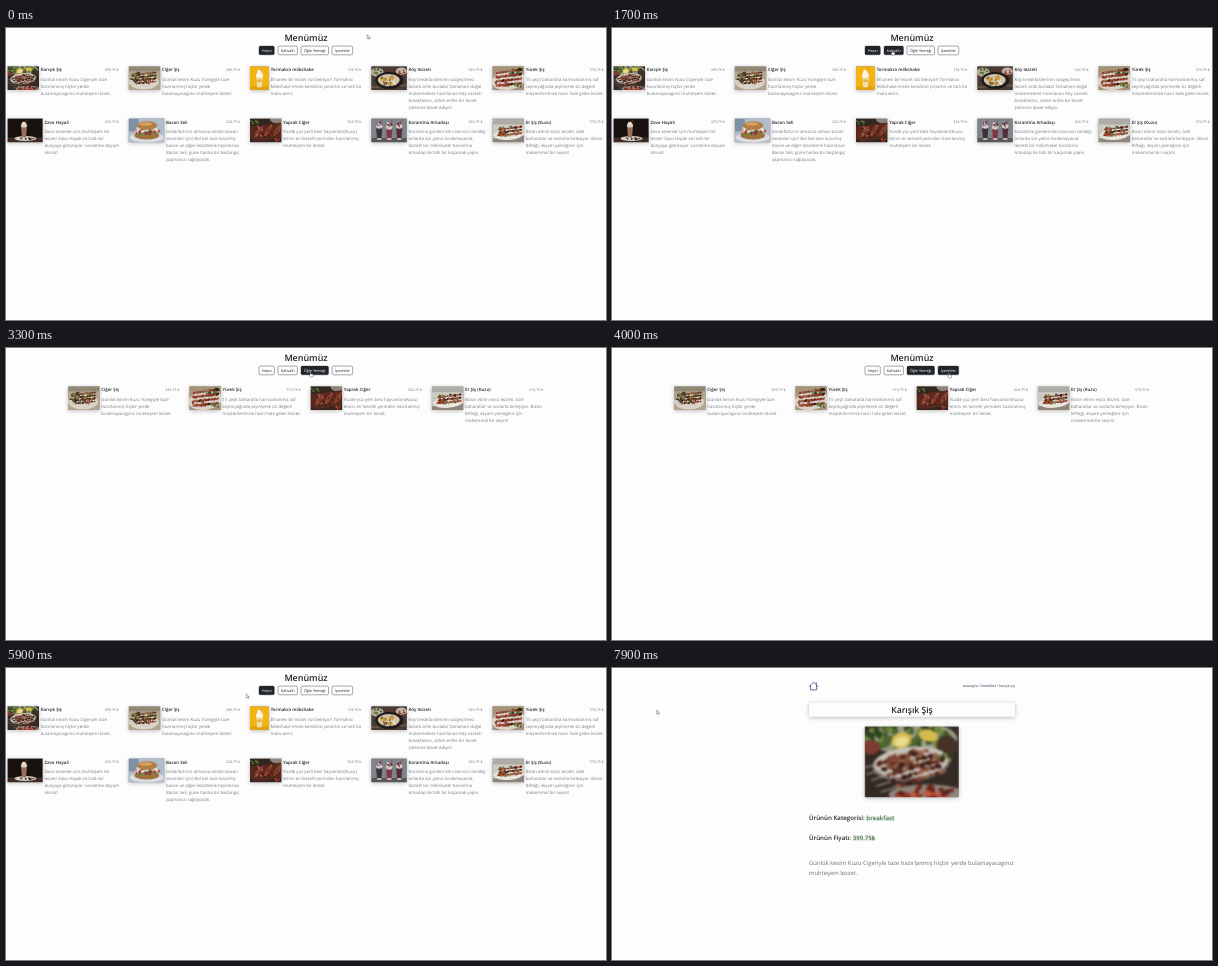
Recreate the animation shown at these times as an HTML page. Size 600 px wide and 292 px high, loop 8000 ms.

```html
<!DOCTYPE html>
<html lang="tr">
<head>
<meta charset="utf-8">
<title>Menümüz</title>
<style>
  html, body { margin: 0; width: 100%; height: 100%; overflow: hidden; background: #fdfdfd; }
  svg { display: block; width: 100%; height: 100%; font-family: "Open Sans", "Noto Sans", sans-serif; text-rendering: geometricPrecision; }
  .h { font-weight: 600; fill: #212529; }
  .body { font-size: 4.34px; fill: #757b82; }
  .price { font-size: 3.6px; fill: #6c757d; text-anchor: end; }
  .btn { font-size: 3.75px; text-anchor: middle; }
  .mid { text-anchor: middle; }
  .photo { filter: drop-shadow(0 1.5px 2px rgba(0, 0, 0, .26)); }
  .soft { filter: blur(.3px); }
  .value { fill: #587a5a; text-shadow: 0 1px 1px rgba(60, 150, 80, .45); }
</style>
</head>
<body>
<svg id="stage" viewBox="0 0 600 292" xmlns="http://www.w3.org/2000/svg"></svg>
<script>
const LOOP = 8000, STEP = 100, PITCH = 121.25, PHOTO_H = 23.7;
const stage = document.getElementById('stage');

// ---- drawing helpers (return SVG markup) ----
let seed = 7;
const rnd = () => (seed = (seed * 16807) % 2147483647) / 2147483647;
const rect = (x, y, w, h, fill, r = 0) => `<rect x="${x}" y="${y}" width="${w}" height="${h}" rx="${r}" fill="${fill}"/>`;
const oval = (x, y, rx, ry, fill, rot = 0) => `<ellipse cx="${x}" cy="${y}" rx="${rx}" ry="${ry}" fill="${fill}" transform="rotate(${rot} ${x} ${y})"/>`;
const line = (x1, y1, x2, y2, color, w) => `<path d="M${x1} ${y1}L${x2} ${y2}" stroke="${color}" stroke-width="${w}"/>`;
const poly = (points, fill) => `<polygon points="${points}" fill="${fill}"/>`;
const text = (x, y, cls, str, size) => `<text x="${x}" y="${y}" class="${cls}"${size ? ` font-size="${size}"` : ''}>${str}</text>`;

// Scatter small ovals inside an ellipse.
function scatter(n, x, y, rx, ry, size, colors) {
  let out = '';
  for (let i = 0; i < n; i++) {
    const a = rnd() * 6.283, d = Math.sqrt(rnd());
    out += oval((x + Math.cos(a) * d * rx).toFixed(2), (y + Math.sin(a) * d * ry).toFixed(2),
      size * (.7 + rnd() * .6), size * (.45 + rnd() * .4), colors[i % colors.length], rnd() * 180);
  }
  return out;
}

// A skewer with uneven, overlapping chunks along it.
function skewer(x1, y1, x2, y2, size, colors) {
  let out = line(x1, y1, x2, y2, '#a39d92', .35);
  const angle = Math.atan2(y2 - y1, x2 - x1) * 57.3;
  for (let i = 0; i < 9; i++) {
    const k = .26 + i * .085, s = size * (.8 + rnd() * .4);
    out += oval(x1 + (x2 - x1) * k, y1 + (y2 - y1) * k, s, s * .7, colors[Math.floor(rnd() * colors.length)], angle + rnd() * 60 - 30);
  }
  return out;
}

const glass = (x, y, w, h, drink, foam) =>
  poly(`${x - w / 2},${y} ${x + w / 2},${y} ${x + w * .34},${y + h} ${x - w * .34},${y + h}`, drink) +
  oval(x, y, w * .52, w * .34, foam);

const MEAT = ['#5a2c1f', '#7d4632', '#3b1e17', '#945c47'];
const GREEN = ['#4c6430', '#71883f', '#2f4320'];
const RED = ['#9c3424', '#c4553c', '#762519'];

const photos = {
  mixed: w => rect(0, 0, w, 24, '#332a26') + oval(16, 4, 15, 5.5, '#9d9d86') + scatter(46, 14, 3.5, 14, 4.2, 1.6, GREEN) +
    oval(12.3, 4.6, 3.4, 2.6, '#d3bb4e', -14) + oval(12.3, 5, 2.4, 1.6, '#e9dc8c', -14) +
    oval(21.3, 3, 3.2, 2, '#d3bb4e', 14) + oval(27.5, 6.5, 3.5, 3.5, '#463126') + oval(2, 7, 3, 2.4, '#7e3b2f') +
    oval(15.5, 12.6, 13, 5.7, '#77716b', -5) + oval(15.5, 12, 12.6, 5.2, '#c6c0b7', -5) +
    scatter(40, 17, 11.6, 9.8, 3.2, 1.3, MEAT) +
    [0, 1, 2, 3, 4].map(i => skewer(-1 + i * 1.6, 14 + i * 2, 22 + i * 1.3, 7.8 + i * 1.7, 1.05, MEAT)).join('') +
    scatter(10, 18, 11, 8, 3, .45, ['#c08a72', '#e0b8a0']) + scatter(5, 27, 10, 2, 2, .8, GREEN) +
    oval(21, 22.8, 13, 3.4, '#8f837c') + scatter(30, 20, 22.5, 11, 2.3, 1.2, [...RED, '#56251c']),
  liver: w => rect(0, 0, w, 24, '#b3a48d') + rect(0, 0, w, 5, '#8f8874') + oval(15, 15.5, 15, 7.6, '#d8d2c8') +
    scatter(34, 14, 11.5, 12, 5.5, 1.8, [...GREEN, '#4a3020']) +
    [0, 1, 2, 3].map(i => skewer(1, 9 + i * 3, 28, 6 + i * 3, 1.3, MEAT)).join('') + scatter(6, 20, 15, 6, 3, 1.1, RED),
  yellowShake: w => rect(0, 0, w, 24, '#f3b411') + rect(0, 20, w, 4, '#e2a40e') +
    glass(9.5, 9, 6.8, 12, '#f2dfb2', '#fbf3e0') + oval(9.5, 6, 2.4, 2.6, '#fdf6e8') +
    line(10.5, 6, 12.2, 1.5, '#d9752f', .6) + rect(7, 13, 5, 3, '#e5b860', .6),
  eggs: w => rect(0, 0, w, 24, '#4a3a31') + line(0, 21, w, 19, '#6b594c', 1.5) +
    oval(6, 6, 6.5, 4.5, '#b5ab99') + scatter(8, 6, 5, 4, 2.4, 1.3, GREEN) + oval(30, 5, 5.5, 3.8, '#bdb4a5') + scatter(7, 30, 6, 3.5, 2.4, 1.1, RED) +
    oval(18, 14, 14, 8.6, '#1f1c1b') + oval(17.5, 13.8, 11, 6.2, '#cfc3a8') + scatter(16, 17, 14, 10, 5.5, 1.2, ['#8a6a3f', '#5c4429', '#eee7d8']) +
    oval(13, 13, 2.5, 1.9, '#d69a2b') + oval(20.5, 11.8, 2.5, 1.9, '#d69a2b') + oval(19, 16.7, 2.4, 1.6, '#cf9028') + scatter(7, 17, 14, 8, 5, .6, GREEN),
  heart: w => rect(0, 0, w, 24, '#a99378') + oval(16, 14, 17, 9.5, '#d9d2c8', -8) + scatter(16, 24, 6, 7, 4, 1.5, GREEN) +
    [0, 1, 2, 3].map(i => skewer(-4, 8 + i * 4, 30, 3 + i * 4.6, 1.8, [...MEAT, '#9c3424'])).join('') +
    scatter(12, 10, 18, 8, 3, 1.2, RED) + scatter(9, 25, 19, 5, 2.4, 1.2, GREEN),
  cookieShake: w => rect(0, 0, w, 24, '#17120f') + rect(0, 19, w, 5, '#3d2a20') + oval(18, 20, 11, 2.6, '#d5cfc8') +
    scatter(8, 19, 20, 8, 1.4, 1.2, ['#2a1b15', '#4a3024']) + glass(16.5, 7, 6, 12, '#99705b', '#dfcabb') + oval(16.5, 5, 2.3, 1.7, '#ece2d8') +
    line(17.5, 5, 19.5, .8, '#a14436', .6),
  bacon: w => rect(0, 0, w, 24, '#aebccc') + rect(0, 0, 10, 13, '#7f91a6') + oval(18, 19, 17, 5, '#dcdde2') +
    oval(18, 17, 12.5, 4, '#a0713f') + scatter(14, 17, 14.5, 13, 2.2, 1.8, GREEN) + scatter(22, 18, 12.5, 12, 2.6, 1.8, ['#8c3c31', '#d9a28c', '#b0584a', '#efe3cc']) +
    oval(18.5, 7, 10, 4.2, '#b37c40') + oval(17, 5.4, 6.5, 1.8, '#d0a261'),
  slab: w => rect(0, 0, w, 24, '#33251f') + oval(28, 1, 8, 4, '#8d857d') + poly(`0,8 ${w},4 ${w},19 6,23 0,20`, '#55291f') +
    [0, 1, 2, 3, 4, 5].map(i => oval(4 + i * 4.7, 13.5 - i * .4, 2.2, 7, i % 2 ? '#84402f' : '#5f271c', 34)).join('') +
    scatter(26, 16, 12, 14, 6.5, 1, ['#b06a52', '#2d140f', '#713324']) + scatter(9, 5, 4, 5, 2, 1.2, GREEN) + scatter(4, 27, 21, 3, 2, 1.2, RED),
  trio: w => rect(0, 0, w, 24, '#7f838a') + rect(0, 19.5, w, 4.5, '#5a5558') +
    ['#3b3138', '#7d3844', '#54303a'].map((c, i) => glass(8 + i * 10, 8 + i % 2, 6.4, 13, c, '#cfc5c6') +
      scatter(8, 8 + i * 10, 5.8, 2.8, 2.2, 1, ['#9a3340', '#e2d9d6', '#332428']) + oval(8 + i * 10, 20.5, 2.6, .9, '#c9c3c3') +
      line(9 + i * 10, 6, 11 + i * 10, 1, '#b03d47', .6)).join(''),
  lamb: w => rect(0, 0, w, 24, '#cfccc6') + rect(0, 0, w, 6, '#aeaca6') + poly(`0,20 ${w},17 ${w},24 0,24`, '#8f867b') + oval(16, 16, 15, 5.5, '#e9e6e0', -4) +
    scatter(26, 15, 12.5, 12, 4.5, 1.5, GREEN) + [0, 1, 2].map(i => skewer(0, 12 + i * 3, 30, 8 + i * 3.2, 1.5, [...MEAT, '#b5563a'])).join('') + scatter(6, 11, 16, 6, 2.5, 1.1, RED)
};

// ---- menu ----
const dish = (kind, photo, w, title, price, lines) => ({ kind, photo, w, title, price, lines: lines.split('|') });
const menu = [
  dish('breakfast', 'mixed', 31.5, 'Karışık Şiş', '399.75', 'Günlük kesim Kuzu Cigeriyle taze|hazırlanmış hiçbir yerde|bulamayacagınız muhteşem lezzet.'),
  dish('lunch', 'liver', 31.5, 'Ciğer Şiş', '349.75', 'Günlük kesim Kuzu Yüregiyle taze|hazırlanmış hiçbir yerde|bulamayacagınız muhteşem lezzet.'),
  dish('drinks', 'yellowShake', 19, 'Tormakra milkshake', '174.75', 'Efsanevi bir lezzet sizi bekliyor! Tormakra|Milkshake imizle kendinizi şımartın ve tatlı bir|mola verin.'),
  dish('breakfast', 'eggs', 35.6, 'Köy lezzeti', '524.75', 'Köy breakfastlerinin vazgeçilmez|lezzeti artık burada! Tamamen doğal|malzemelerle hazırlanan Köy Lezzeti|breakfastısı, sizleri enfes bir lezzet|şölenine davet ediyor.'),
  dish('lunch', 'heart', 31.5, 'Yürek Şiş', '574.75', '15 çeşit baharatla harmanlanmış saf|zeytinyağında pişirilerek siz değerli|müşterilerimize hazır hale gelen lezzet.'),
  dish('drinks', 'cookieShake', 35.2, 'Zavo Hayali', '474.75', 'Zavo sevenler için muhteşem bir|lezzet! Zavo Hayali sizi tatlı bir|dünyaya götürüyor. Lezzetine doyum|olmaz!'),
  dish('breakfast', 'bacon', 35.5, 'Bacon Seli', '224.75', 'breakfastının olmazsa olmazı bacon|sevenleri için! Bol bol taze kızarmış|bacon ve diğer lezzetlerle hazırlanan|Bacon Seli, güne harika bir başlangıç|yapmanızı sağlayacak.'),
  dish('lunch', 'slab', 31.5, 'Yaprak Ciğer', '324.75', 'Yüzde yüz yerli besi hayvanları(Kuzu)|etinin en lezzetli yerinden hazırlanmış|muhteşem bir lezzet.'),
  dish('drinks', 'trio', 35.6, 'Karantina Arkadaşı', '424.75', 'Karantina günlerinde canınızın sıkıldığı|anlarda sizi yalnız bırakmayacak|lezzetli bir milkshake! Karantina|Arkadaşı ile tatlı bir kaçamak yapın.'),
  dish('lunch', 'lamb', 31.5, 'Et Şiş (Kuzu)', '574.75', 'Bizon etinin eşsiz lezzeti, özel|baharatlar ve soslarla birleşiyor. Bizon|Bifteği, akşam yemeğiniz için|mükemmel bir seçim!')
];

function photo(name, w, x, y, scale = 1) {
  seed = 7 + name.length * 131;
  return `<g class="photo"><svg x="${x}" y="${y}" width="${w * scale}" height="${PHOTO_H * scale}" viewBox="0 0 ${w} ${PHOTO_H}" preserveAspectRatio="none">
    <g clip-path="inset(0 round ${1.2 / scale}px)"><g class="soft">${rect(-2, -2, w + 4, 28, '#6b6158')}${photos[name](w)}</g></g></svg></g>`;
}

function card(d, x, y) {
  const tx = x + d.w + 1.7;
  return photo(d.photo, d.w, x, y) + text(tx, y + 5, 'h', d.title, 4.4) +
    text(x + 111.4, y + 4.6, 'price', d.price + ' ₺') +
    d.lines.map((s, i) => text(tx, y + 14.5 + i * 7.08, 'body', s)).join('');
}

function list(kind) {
  const items = menu.filter(d => kind === 'all' || d.kind === kind);
  const cols = Math.min(5, items.length), left = 1.5 + (5 - cols) * PITCH / 2;
  return items.map((d, i) => card(d, left + i % cols * PITCH, 38.3 + Math.floor(i / cols) * 52.2)).join('');
}

const kinds = ['all', 'breakfast', 'lunch', 'drinks'];
const buttons = [
  { label: 'Hepsi', x: 253, w: 15.3 },
  { label: 'Kahvaltı', x: 272, w: 19.4 },
  { label: 'Öğle Yemeği', x: 295, w: 27.5 },
  { label: 'İçecekler', x: 326, w: 20.7 }
];
const BTN_Y = 18.1, BTN_H = 8.7;

const detail = `
  <g fill="none" stroke="#465a86" stroke-width=".85" stroke-linejoin="round" stroke-linecap="round">
    <path d="M197.3 18.4L201.6 14.1L205.9 18.4M198.6 17.4V21.9H204.6V17.4M204.3 16.4V14.6"/></g>
  <text x="403" y="18.7" font-size="3.55" fill="#2c3150" text-anchor="end">anasayfa / breakfast / karışık şiş</text>
  <rect class="photo" x="197" y="34.4" width="206" height="14.3" rx="1" fill="#fdfdfd"/>
  ${text(300, 45.3, 'h mid', menu[0].title, 8.6)}
  ${photo('mixed', 31.5, 252.8, 58.5, 2.985)}
  ${text(197, 152.4, 'h', 'Ürünün Kategorisi: <tspan class="value">breakfast</tspan>', 6.15)}
  ${text(197, 171.6, 'h', 'Ürünün Fiyatı: <tspan class="value">399.75₺</tspan>', 6.15)}
  <g font-size="5.9" fill="#6c757d">
    <text x="197" y="197.1">Günlük kesim Kuzu Cigeriyle taze hazırlanmış hiçbir yerde bulamayacagınız</text>
    <text x="197" y="207.1">muhteşem lezzet.</text></g>`;

stage.innerHTML = `<rect width="600" height="292" fill="#fdfdfd"/>
  <g id="head">${text(300, 12.6, 'h mid', 'Menümüz', 8.95)}
  ${buttons.map(b => `<g class="tab"><rect x="${b.x}" y="${BTN_Y}" width="${b.w}" height="${BTN_H}" rx="1.4" stroke="#212529" stroke-width=".4"/>${text(b.x + b.w / 2, 23.9, 'btn', b.label)}</g>`).join('')}</g>
  ${kinds.map(k => `<g id="${k}">${list(k)}</g>`).join('')}
  <g id="detail">${detail}</g>
  <g id="cursor" stroke="#222" stroke-width=".35" stroke-linejoin="round" fill="#fff">
    <path id="arrow" d="M0 0V4.2L1 3.3L1.7 4.8L2.3 4.5L1.7 3.1H3Z"/>
    <path id="hand" d="M-.4 .3Q0 -.2 .4 .3V1.8L2.4 2.3Q2.8 2.5 2.6 3.5L2.2 4.9H-.1L-1.5 3Q-1.4 2.3 -.4 2.9Z"/></g>`;

// ---- timeline ----
const views = [[0, 'all'], [1800, 'breakfast'], [2900, 'lunch'], [4200, 'drinks'], [5500, 'all'], [7500, 'detail']];
const path = [
  [0, 361.3, 6.6], [100, 361, 7], [800, 292.5, 16], [950, 281, 22], [1700, 280.3, 22.3], [2200, 281, 22.5],
  [2600, 301.5, 23.7], [3200, 302, 24], [3800, 337, 25], [4300, 337, 25.2], [4500, 334, 30],
  [4850, 268, 29.5], [4950, 263.2, 23.8], [5700, 263, 24], [6700, 44.7, 41.3], [8000, 44.7, 41.9]
];
const smooth = k => k * k * (3 - 2 * k);

function viewAt(t) {
  return views.filter(v => v[0] <= t).pop()[1];
}

function cursorAt(t) {
  const i = Math.max(1, path.findIndex(p => p[0] >= t));
  const [t0, x0, y0] = path[i - 1], [t1, x1, y1] = path[i];
  const k = smooth((t - t0) / (t1 - t0));
  return [x0 + (x1 - x0) * k, y0 + (y1 - y0) * k];
}

function over(b, t) {
  const [x, y] = cursorAt(t);
  return x >= b.x && x <= b.x + b.w && y >= BTN_Y && y <= BTN_Y + BTN_H;
}

// Averaging the last 150 ms gives a linear hover fade.
function darkness(b, i, t) {
  let sum = 0;
  for (let k = 0; k < 10; k++) {
    const s = Math.max(0, t - k * 15);
    if (viewAt(s) === kinds[i] || over(b, s)) sum++;
  }
  return sum / 10;
}

const mix = (a, b, k) => `rgb(${a.map((v, i) => Math.round(v + (b[i] - v) * k))})`;
const DARK = [33, 37, 41], LIGHT = [253, 253, 253];
const $ = id => document.getElementById(id);
const show = (id, on) => { $(id).style.display = on ? '' : 'none'; };
const tabs = [...document.querySelectorAll('.tab')];

function draw(t) {
  const view = viewAt(t), [x, y] = cursorAt(t);
  [...kinds, 'detail'].forEach(k => show(k, k === view));
  show('head', view !== 'detail');
  buttons.forEach((b, i) => {
    const k = darkness(b, i, t), [box, label] = tabs[i].children;
    box.setAttribute('fill', mix(LIGHT, DARK, k));
    label.setAttribute('fill', mix(DARK, LIGHT, k));
  });
  const link = view !== 'detail' && (buttons.some(b => over(b, t)) || (x < 57 && y < 45));
  show('hand', link);
  show('arrow', !link);
  $('cursor').setAttribute('transform', `translate(${x} ${y})`);
}

const start = performance.now();
function tick() {
  const t = (performance.now() - start) % LOOP;
  draw(Math.floor(t / STEP) * STEP);
  requestAnimationFrame(tick);
}
tick();
</script>
</body>
</html>
```
